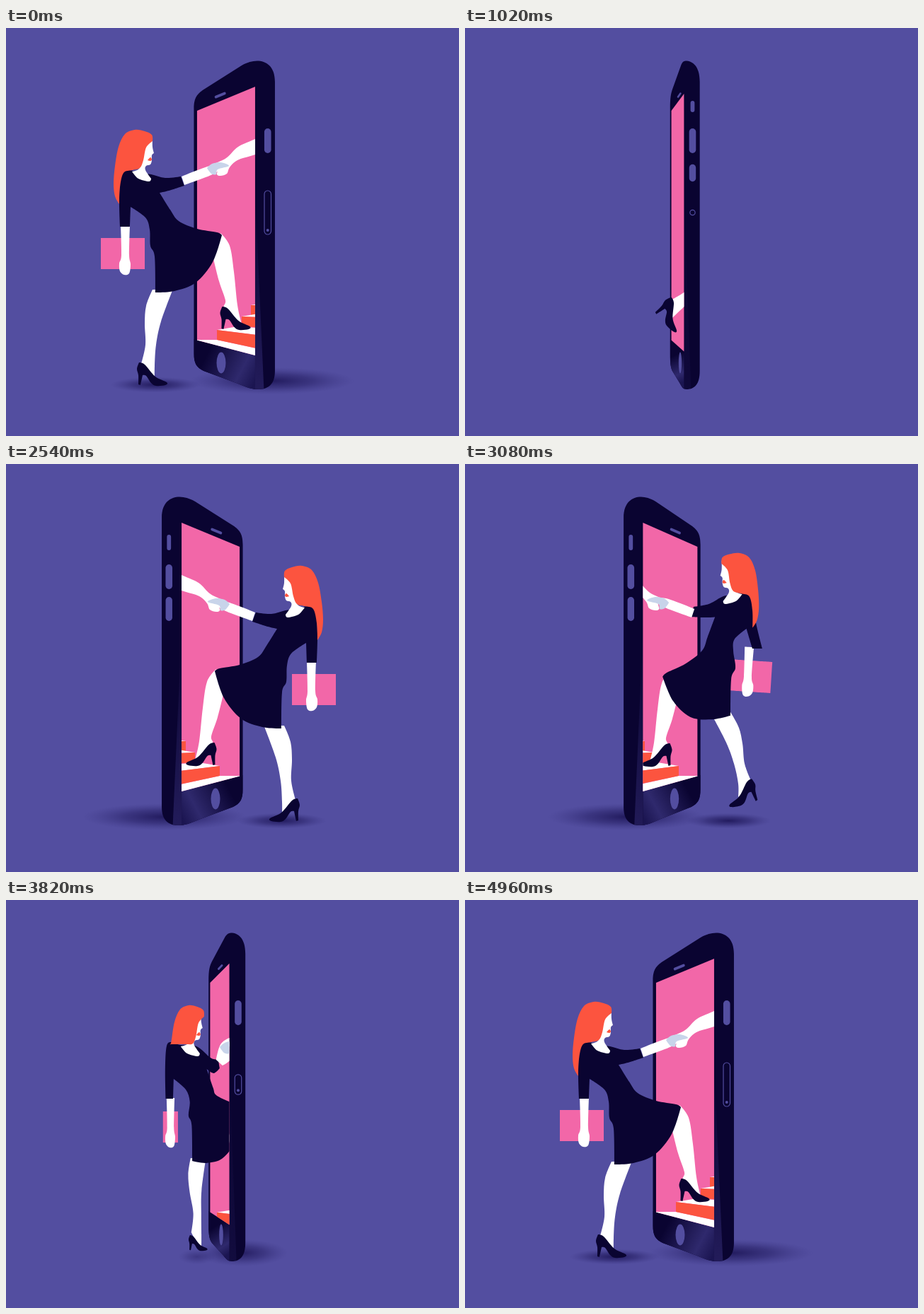
These frames come from a looping animation (640 px wide and 577 px high, 4980 ms). An HTML page with a canvas:

```html
<!DOCTYPE html>
<html lang="en">
<head>
<meta charset="utf-8">
<title>Through the phone</title>
<style>
  html, body { margin: 0; width: 100%; height: 100%; overflow: hidden; background: #534ea0; }
  canvas { display: block; width: 640px; height: 577px; }
</style>
</head>
<body>
<canvas id="stage" width="640" height="577"></canvas>
<script>
const ctx = document.getElementById('stage').getContext('2d');
const LOOP = 4980, HALF = LOOP / 2, OPEN = 82;
const BG = '#534ea0', NAVY = '#0a0431', PINK = '#f267a8', RED = '#fc543f', WHITE = '#fff', ICE = '#c8d4ea';

const clamp = (v, a = 0, b = 1) => Math.min(b, Math.max(a, v));
const ramp = (v, a, b) => clamp((v - a) / (b - a));
const smooth = u => u * u * (3 - 2 * u);
const lerp = (a, b, t) => a + (b - a) * t;
const blend = (a, b, t) => a.map((v, i) => lerp(v, b[i], t));

// Apply a rule (x, y) => [x, y] to a flat point list.
function warp(pts, rule) {
  const out = [];
  for (let i = 0; i < pts.length; i += 2) out.push(...rule(pts[i], pts[i + 1]));
  return out;
}

// Shift a point list, turning and scaling it about a pivot.
function move(pts, dx, dy, deg = 0, sx = 1, sy = 1, px = pts[0], py = pts[1]) {
  const c = Math.cos(deg * Math.PI / 180), s = Math.sin(deg * Math.PI / 180);
  return warp(pts, (x, y) => {
    x = (x - px) * sx;
    y = (y - py) * sy;
    return [px + dx + x * c - y * s, py + dy + x * s + y * c];
  });
}

// Monotone cubic through [time, value] keys.
function curve(keys) {
  const n = keys.length, slope = [], tan = [];
  for (let i = 0; i < n - 1; i++)
    slope.push((keys[i + 1][1] - keys[i][1]) / (keys[i + 1][0] - keys[i][0]));
  for (let i = 0; i < n; i++) {
    const a = slope[i - 1], b = slope[i];
    tan.push(i && i < n - 1 && a * b > 0 ? 2 * a * b / (a + b) : 0);
  }
  return t => {
    if (t <= keys[0][0]) return keys[0][1];
    for (let i = 0; i < n - 1; i++) {
      const [t0, v0] = keys[i], [t1, v1] = keys[i + 1];
      if (t > t1) continue;
      const h = t1 - t0, u = (t - t0) / h, r = 1 - u;
      return v0 * r * r * (1 + 2 * u) + v1 * u * u * (3 - 2 * u) + h * u * r * (tan[i] * r - tan[i + 1] * u);
    }
    return keys[n - 1][1];
  };
}

// Signed screen width over one half of the loop; below zero the phone faces the other way.
const turn = curve([[150, 82], [590, 77], [1020, 18], [1330, -27], [1620, -68],
  [1830, -75], [2050, -79], [2440, -82]]);

function poly(pts, fill) {
  ctx.beginPath();
  for (let i = 0; i < pts.length; i += 2) ctx.lineTo(pts[i], pts[i + 1]);
  ctx.closePath();
  ctx.fillStyle = fill;
  ctx.fill();
}

// Closed smooth outline through the points; listed corners stay sharp.
function blob(pts, fill, corners) {
  const n = pts.length / 2;
  const at = i => { i = (i + n) % n; return [pts[2 * i], pts[2 * i + 1]]; };
  const tangent = i => {
    if (corners.includes((i + n) % n)) return [0, 0];
    const a = at(i - 1), b = at(i + 1);
    return [(b[0] - a[0]) / 6, (b[1] - a[1]) / 6];
  };
  ctx.beginPath();
  ctx.moveTo(...at(0));
  for (let i = 0; i < n; i++) {
    const p = at(i), q = at(i + 1), tp = tangent(i), tq = tangent(i + 1);
    ctx.bezierCurveTo(p[0] + tp[0], p[1] + tp[1], q[0] - tq[0], q[1] - tq[1], q[0], q[1]);
  }
  ctx.fillStyle = fill;
  ctx.fill();
}

function pill(x, mid, half, w) {
  ctx.beginPath();
  ctx.roundRect(x - w / 2, mid - half, w, 2 * half, Math.min(w / 2, half));
}

function shadow(x, y, rx, ry, alpha) {
  if (alpha <= 0) return;
  ctx.save();
  ctx.translate(x, y);
  ctx.scale(rx, ry);
  const g = ctx.createRadialGradient(0, 0, 0, 0, 0, 1);
  g.addColorStop(0, `rgba(22,14,78,${0.8 * alpha})`);
  g.addColorStop(0.5, `rgba(30,23,90,${0.45 * alpha})`);
  g.addColorStop(1, 'rgba(50,44,120,0)');
  ctx.fillStyle = g;
  ctx.fillRect(-1, -1, 2, 2);
  ctx.restore();
}

// Body parts in drawing order. Poses: rest, pulled, arriving, leaving.
const parts = [];
function part(fill, corners, rest, pulled, arriving, leaving) {
  parts.push({ fill, corners, rest, pulled, arriving, leaving: leaving || move(pulled, 145, -45) });
}

const book = [134, 297, 196, 297, 196, 341, 134, 341];
part(PINK, [0, 1, 2, 3], book, move(book, 32, -17, -3.7), move(book, 88, 2, 0, 0.34));

const backArm = [162, 279, 163, 321, 160, 333, 161, 344, 167, 349, 174, 347, 176, 334, 174, 321, 175, 279];
part(WHITE, [0, 8], backArm, move(backArm, 30, -20, -3), move(backArm, 65, 1, 0, 0.87));

const shoe = [188, 473, 185, 482, 187, 491, 187, 504, 190, 505, 193, 491, 198, 492, 205, 502,
  212, 506, 225, 505, 227, 501, 211, 493, 196, 476];
const shoeCorners = [0, 3, 4, 5];

const backLeg = [207, 370, 198, 393, 196, 418, 197, 448, 191, 475, 196, 482, 210, 497, 210, 478,
  212, 448, 219, 415, 236, 369];
part(WHITE, [0, 4, 6, 10], backLeg,
  warp(backLeg, (x, y) => {
    const u = ramp(y, 372, 478);
    return [x + lerp(18, 4, u), y - lerp(19, 26, u)];
  }),
  warp(backLeg, (x, y) => [x + lerp(54, 67, ramp(y, 370, 460)) - 0.25 * (x - 207), y - 5]),
  move(backLeg, 103, -92, 45, 1, 1, shoe[0], shoe[1]));
part(NAVY, shoeCorners, shoe, move(shoe, 7, -28, 14),
  move(shoe, 72, 1, 0, 0.62, 0.67), move(shoe, 103, -92, 45));

const frontLeg = [292, 322, 301, 358, 310, 385, 309, 397, 333, 419, 327, 392, 322, 345, 316, 308, 303, 290];
part(WHITE, [0, 4, 8], frontLeg, move(frontLeg, 6, 2), move(frontLeg, 22, 14));
const frontShoe = move(shoe, 117.5, -79);
part(NAVY, shoeCorners, frontShoe, move(frontShoe, 5, 1), move(frontShoe, 22, 2));

const dress = [163, 206, 160, 240, 161, 281, 175, 281, 176, 253, 197, 268, 203, 285, 204, 308, 210, 323,
  211, 374, 238, 372, 268, 360, 292, 331, 305, 293, 298, 289, 270, 284, 244, 273, 232, 257, 217, 233,
  230, 230, 252, 223, 247, 210, 225, 212, 205, 207, 188, 205, 174, 201];
part(NAVY, [2, 3, 4, 9, 13, 18, 20, 21], dress,
  warp(dress, (x, y) => [x + 30 - 16 * ramp(y, 240, 300), y - 20 + 0.28 * Math.max(0, x - 205)]),
  warp(dress, (x, y) => {
    const chest = 16 * ramp(x, 195, 210) * (1 - ramp(y, 250, 300));
    const lift = 15 * ramp(x, 208, 230) * (1 - ramp(y, 240, 280));
    const hem = (0.18 * (x - 205) - 6) * ramp(y, 285, 330);
    return [x + 55 - 0.25 * (x - 200) + chest - 8 * ramp(x, 235, 250) * (1 - ramp(y, 230, 260)), y + lift + hem];
  }));

const face = [200, 156, 207, 156, 207, 168, 209, 177, 206, 180, 206, 187, 204, 193, 198, 195, 197, 201,
  205, 213, 202, 217, 187, 213, 178, 203, 188, 199, 193, 185];
part(WHITE, [1, 3, 9, 12], face, move(face, 30.5, -19), move(face, 69, 4));

const lips = [200, 187, 204, 183, 206, 186, 204, 188];
part(RED, [0], lips, move(lips, 30.5, -19), move(lips, 69, 4));

const hair = [206, 151, 196, 146, 182, 144, 168, 150, 159, 168, 154, 195, 152, 220, 154, 238, 160, 249,
  161, 225, 166, 205, 178, 201, 189, 198, 194, 187, 198, 169, 207, 160];
part(RED, [8, 15], hair, move(hair, 30.5, -19, -2),
  warp(hair, (x, y) => [x + lerp(80, 73, ramp(x, 152, 207)), Math.min(y + 5, 204)]));

const forearm = [248, 210, 288, 195, 303, 197, 292, 207, 252, 222];
part(WHITE, [0, 4], forearm, move(forearm, 28, -5),
  [297, 226, 304, 203, 322, 195, 320, 222, 306, 234]);

const helper = [410, 130, 352, 157, 328, 168, 311, 184, 289, 195, 299, 198, 298, 207, 303, 209,
  312, 206, 316, 197, 327, 187, 352, 179, 410, 160];
part(WHITE, [0, 12], helper, move(helper, 28, -2), move(helper, 18, 10));

const grip = [284, 198, 291, 192, 303, 190, 315, 195, 299, 200, 297, 207, 290, 206];
part(ICE, [0], grip, move(grip, 28, -2), move(grip, 18, 10));

function drawWoman(p, w, entering, edge) {
  const e = (OPEN - w) / 55;
  const exit = Math.max(0, (p - 610) / 410) ** 2;
  const rise = smooth(ramp(p, 170, 610));
  ctx.save();
  ctx.beginPath();
  ctx.rect(-100, 0, edge + 100, 577);
  ctx.clip();
  for (const { fill, corners, rest, pulled, arriving, leaving } of parts) {
    let pts;
    if (entering) pts = move(blend(rest, arriving, e), Math.max(0, e - 1) * 80, 0);
    else if (exit > 0) pts = blend(pulled, leaving, exit);
    else pts = blend(rest, pulled, rise);
    blob(pts, fill, corners);
  }
  ctx.restore();
}

function drawStep(x, y, slope) {
  const end = 362;
  poly([x, y, x + 30, y - 5, end, y - 2, end, y + slope], WHITE);
  poly([x, y, end, y + slope, end, y + 14 + 1.7 * slope, x, y + 14], RED);
}

function drawStairs(s) {
  ctx.save();
  ctx.translate(0, (1 - s) * 21);
  poly([262, 441, 298, 441, 362, 455, 362, 490, 262, 460], WHITE);
  drawStep(346, 392, 0);
  drawStep(333, 408, 1);
  drawStep(298, 427, 8);
  ctx.restore();
}

function drawPhone(w, B, R, stairs, tray, keys) {
  const open = w / OPEN, left = B - w, L = left - 1 - 3.5 * open;
  const X = u => u <= 1 ? lerp(L, B, u) : lerp(B, R, u - 1);
  const bez = (a, b, c, d, e, f) => ctx.bezierCurveTo(X(a), b, X(c), d, X(e), f);

  ctx.save();
  ctx.beginPath();
  ctx.moveTo(X(0), 114);
  bez(0, 98, 0.06, 93, 0.16, 87);
  ctx.lineTo(X(0.78), 53);
  bez(0.88, 48, 0.95, 47, 1.1, 46.5);
  bez(1.55, 46.5, 2, 54, 2, 76);
  ctx.lineTo(X(2), 485);
  bez(2, 503, 1.7, 511, 1.15, 511);
  bez(0.95, 511, 0.85, 508, 0.72, 503);
  ctx.lineTo(X(0.16), 485);
  bez(0.04, 480, 0, 474, 0, 460);
  ctx.closePath();
  ctx.fillStyle = NAVY;
  ctx.fill();
  ctx.clip();

  // sheen on the lower bezel and the side
  let g = ctx.createLinearGradient(L, 455, B, 500);
  g.addColorStop(0.2, NAVY);
  g.addColorStop(0.75, '#2f296d');
  g.addColorStop(1, '#1b1551');
  ctx.fillStyle = g;
  ctx.fillRect(L, 440, B - L, 75);
  g = ctx.createLinearGradient(0, 240, 0, 505);
  g.addColorStop(0, NAVY);
  g.addColorStop(1, '#221b59');
  ctx.globalAlpha = open;
  poly([B, 235, lerp(B, R, 0.45), 515, B, 515], g);
  ctx.restore();

  const k = Math.max(0, 1 - w / 70) ** 2;
  ctx.save();
  poly([left, 117, B, 83 + 18 * k, B, 463 - 10 * k, left, 441.5], PINK);
  ctx.clip();
  if (stairs > 0) drawStairs(stairs);
  ctx.restore();

  // speaker and home button
  const thin = Math.min(1, w / 18);
  const sx = lerp(X(0.6), 302.7, thin), hx = lerp(X(0.7), 304, thin);
  ctx.lineCap = 'round';
  ctx.strokeStyle = ctx.fillStyle = BG;
  ctx.lineWidth = 1.5 + 2.3 * Math.sqrt(open);
  ctx.beginPath();
  ctx.moveTo(sx - 0.5 - 5.6 * open, 97.5);
  ctx.lineTo(sx + 0.5 + 5.6 * open, 92.5);
  if (w > 3) ctx.stroke();
  ctx.beginPath();
  ctx.ellipse(hx, 473.5, thin * (1 + 0.067 * w), 15, 0, 0, 7);
  ctx.fill();

  // side controls
  const bx = R - 10.2;
  pill(bx, 159.5, 17.5, 9.6);
  ctx.fill();
  if (keys > 0) {
    const grow = Math.min(1, keys * 2);
    pill(bx, 111, 11 * keys, 5.8 * grow);
    ctx.fill();
    pill(bx, 205, 17 * keys, 9.4 * grow);
    ctx.fill();
  }
  if (tray > 0) {
    const h = 31 * tray;
    ctx.lineWidth = 1.2;
    pill(bx, 261, h, Math.min(9.5, 2 * h));
    ctx.stroke();
    if (h > 8) {
      ctx.beginPath();
      ctx.arc(bx, 255 + h, 2, 0, 7);
      ctx.fill();
    }
  }
}

function draw(time) {
  const t = time % LOOP, second = t >= HALF, p = t % HALF;
  const signed = turn(p), entering = signed < 0, w = Math.abs(signed);
  const B = w < 18 ? 289 + 1.142 * w : 297.5 + 0.664 * w;
  const R = B + 22 + 6 * (w / OPEN) ** 2;
  const stairs = entering ? ramp(p, 1210, 1610) : 1 - ramp(p, 600, 950);

  let tray, keys;
  if (second) {
    keys = 1 - ramp(p, 850, 1250);
    tray = smooth(ramp(p, 1180, 1500));
  } else {
    tray = 1 - 0.88 * smooth(ramp(p, 620, 1020)) - 0.12 * ramp(p, 1020, 1080);
    keys = smooth(ramp(p, 800, 1140));
  }

  ctx.setTransform(1, 0, 0, 1, 0, 0);
  ctx.fillStyle = BG;
  ctx.fillRect(0, 0, 640, 577);
  if (second !== entering) ctx.setTransform(-1, 0, 0, 1, 600, 0);

  const feet = entering ? lerp(211, 270, (OPEN - w) / 55) : lerp(211, 228, smooth(ramp(p, 170, 610)));
  shadow(R - 4, 499, 38 + 0.95 * w, 19, ramp(w, 18, 28));
  shadow(feet, 504.5, 8 + 0.68 * w, 11, ramp(w, 18, 38));
  drawPhone(w, B, R, stairs, tray, keys);
  drawWoman(p, w, entering, B);
}

function tick(now) {
  draw(now);
  requestAnimationFrame(tick);
}
draw(0);
requestAnimationFrame(tick);
</script>
</body>
</html>
```
